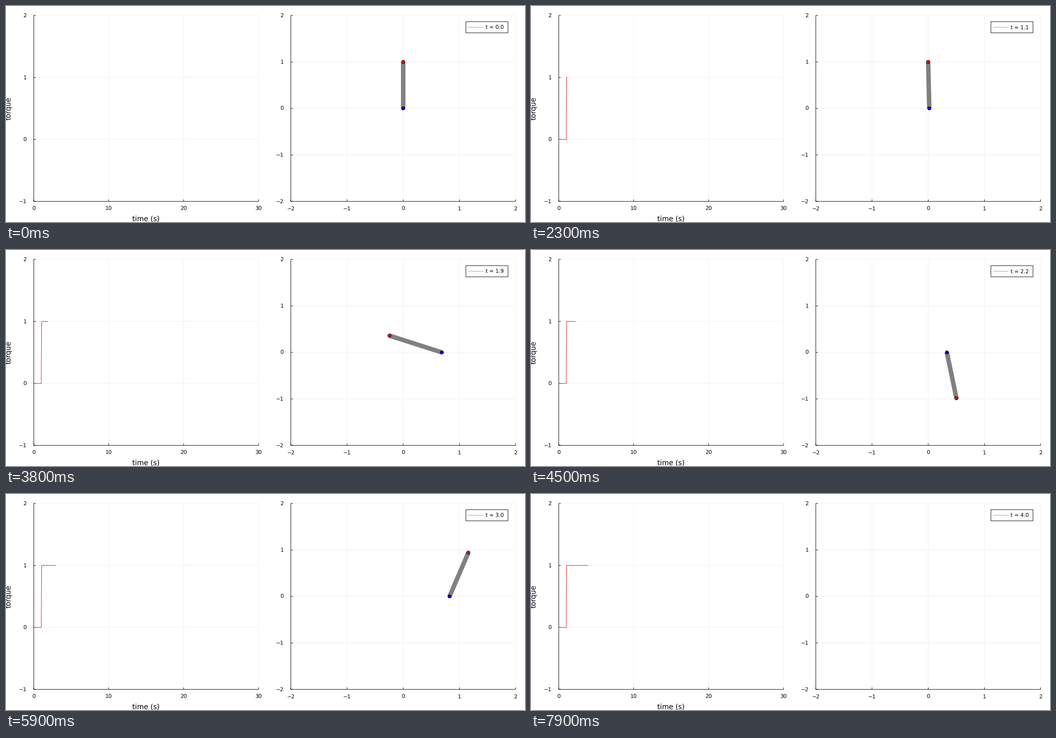
Animation, 1159 px wide and 483 px high, one loop 8 s. Source, as a matplotlib script:

```python
import math

import matplotlib.pyplot as plt
from matplotlib.animation import FuncAnimation
from matplotlib.patches import Circle, Rectangle

W, H, DPI = 1159, 483, 64
FRAMES, INTERVAL = 80, 100
DT = 0.05             # simulated seconds per frame
STEP = 0.001          # integration step
PUSH_START = 0.958    # moment the push takes hold
GRAVITY, FORCE, DAMPING = 9.81, 1.0, 0.00025
PT = 72 / DPI         # points per pixel
GRID, GRAY = "#f0f0f0", "#808080"
SMALL, LARGE = 11.7, 15.8

plt.rcParams.update({"font.family": "DejaVu Sans", "path.snap": False,
                     "text.hinting": "none"})
fig = plt.figure(figsize=(W / DPI, H / DPI), dpi=DPI, facecolor="white")
ax = fig.add_axes([0, 0, 1, 1])
ax.set_xlim(0, W)
ax.set_ylim(H, 0)
ax.axis("off")


class Panel:
    """A plot area that maps data values to stage pixels."""

    def __init__(self, left, right, xlim, ylim, top=21, bottom=437):
        self.left, self.right, self.top, self.bottom = left, right, top, bottom
        self.xlim, self.ylim = xlim, ylim

    def x(self, v):
        a, b = self.xlim
        return self.left + (v - a) / (b - a) * (self.right - self.left)

    def y(self, v):
        a, b = self.ylim
        return self.bottom - (v - a) / (b - a) * (self.bottom - self.top)

    def draw(self, xticks, yticks):
        for v in xticks:
            x = self.x(v)
            line([x, x], [self.bottom, self.top], GRID, z=1)
            line([x, x], [self.bottom, self.bottom - 4.5], "black", z=2)
            label(x, 457, number(v), SMALL, "center")
        for v in yticks:
            y = self.y(v)
            line([self.left, self.right], [y, y], GRID, z=1)
            line([self.left, self.left + 4.5], [y, y], "black", z=2)
            label(self.left - 16.3, y + 4.2, number(v), SMALL, "right")
        line([self.left, self.right], [self.bottom] * 2, "black", z=2)
        line([self.left] * 2, [self.bottom, self.top], "black", z=2)

    def clip(self, artist):
        box = Rectangle((self.left, self.top), self.right - self.left,
                        self.bottom - self.top, transform=ax.transData)
        artist.set_clip_path(box)


def line(xs, ys, color, width=1.0, z=3):
    return ax.plot(xs, ys, color=color, lw=width * PT, zorder=z,
                   solid_capstyle="butt", solid_joinstyle="miter")[0]


def label(x, y, text, size, ha="left", **kw):
    return ax.text(x, y, text, fontsize=size * PT, ha=ha, va="baseline",
                   color="black", zorder=8, **kw)


def number(v):
    return str(v).replace("-", "\u2212")


def dot(color):
    return ax.add_patch(Circle((0, 0), 3.7, fc=color, ec="black",
                               lw=1.0 * PT, zorder=5))


def slope(phi, rate):
    """Pole angle dynamics about the moving centre of mass (unit masses)."""
    s, c = math.sin(phi), math.cos(phi)
    push = GRAVITY * s + 0.5 * FORCE * c - DAMPING * rate
    return rate, (2 * push - s * c * rate * rate) / (1 + s * s)


def simulate(steps):
    phi = rate = 0.0
    angles = [phi]
    h = STEP
    for _ in range(steps):
        a1, b1 = slope(phi, rate)
        a2, b2 = slope(phi + h / 2 * a1, rate + h / 2 * b1)
        a3, b3 = slope(phi + h / 2 * a2, rate + h / 2 * b2)
        a4, b4 = slope(phi + h * a3, rate + h * b3)
        phi += h / 6 * (a1 + 2 * a2 + 2 * a3 + a4)
        rate += h / 6 * (b1 + 2 * b2 + 2 * b3 + b4)
        angles.append(phi)
    return angles


angles = simulate(round((FRAMES * DT - PUSH_START) / STEP))


def pose(n):
    """Cart position and pole tip for frame n."""
    tau = max(0.0, n * DT - PUSH_START)
    phi = angles[round(tau / STEP)]
    base = FORCE * tau * tau / 4 + 0.5 * math.sin(phi)
    return base, base - math.sin(phi), math.cos(phi)


chart = Panel(62, 564, (0, 30), (-1, 2))
scene = Panel(636, 1138, (-2, 2), (-2, 2))
chart.draw((0, 10, 20, 30), (-1, 0, 1, 2))
scene.draw((-2, -1, 0, 1, 2), (-2, -1, 0, 1, 2))
label(313, 480.6, "time (s)", LARGE, "center")
label(10, 229, "torque", LARGE, "center", rotation=90, rotation_mode="anchor")

ax.add_patch(Rectangle((1027, 35), 94, 25, fc="white", ec="black",
                       lw=1.0 * PT, zorder=6))
line([1032.5, 1066], [47.5, 47.5], "#a0a0a0", z=7)
clock = label(1071, 52, "", SMALL)

torque = line([], [], "red")
rod = line([], [], GRAY, 10, z=4)
tip, cart = dot("red"), dot("blue")
for part in (rod, tip, cart):
    scene.clip(part)


def update(n):
    clock.set_text(f"t = {n / 20:.1f}")
    times = range(n + 1) if n else ()
    torque.set_data([chart.x(i * DT) for i in times],
                    [chart.y(1 if i > 20 else 0) for i in times])
    base, tx, ty = pose(n)
    bx, by = scene.x(base), scene.y(0)
    px, py = scene.x(tx), scene.y(ty)
    rod.set_data([bx, px], [by, py])
    tip.set_center((px, py))
    cart.set_center((bx, by))
    return torque, rod, tip, cart, clock


anim = FuncAnimation(fig, update, frames=FRAMES, interval=INTERVAL,
                     repeat=True, repeat_delay=0, blit=False)
plt.show()
```
